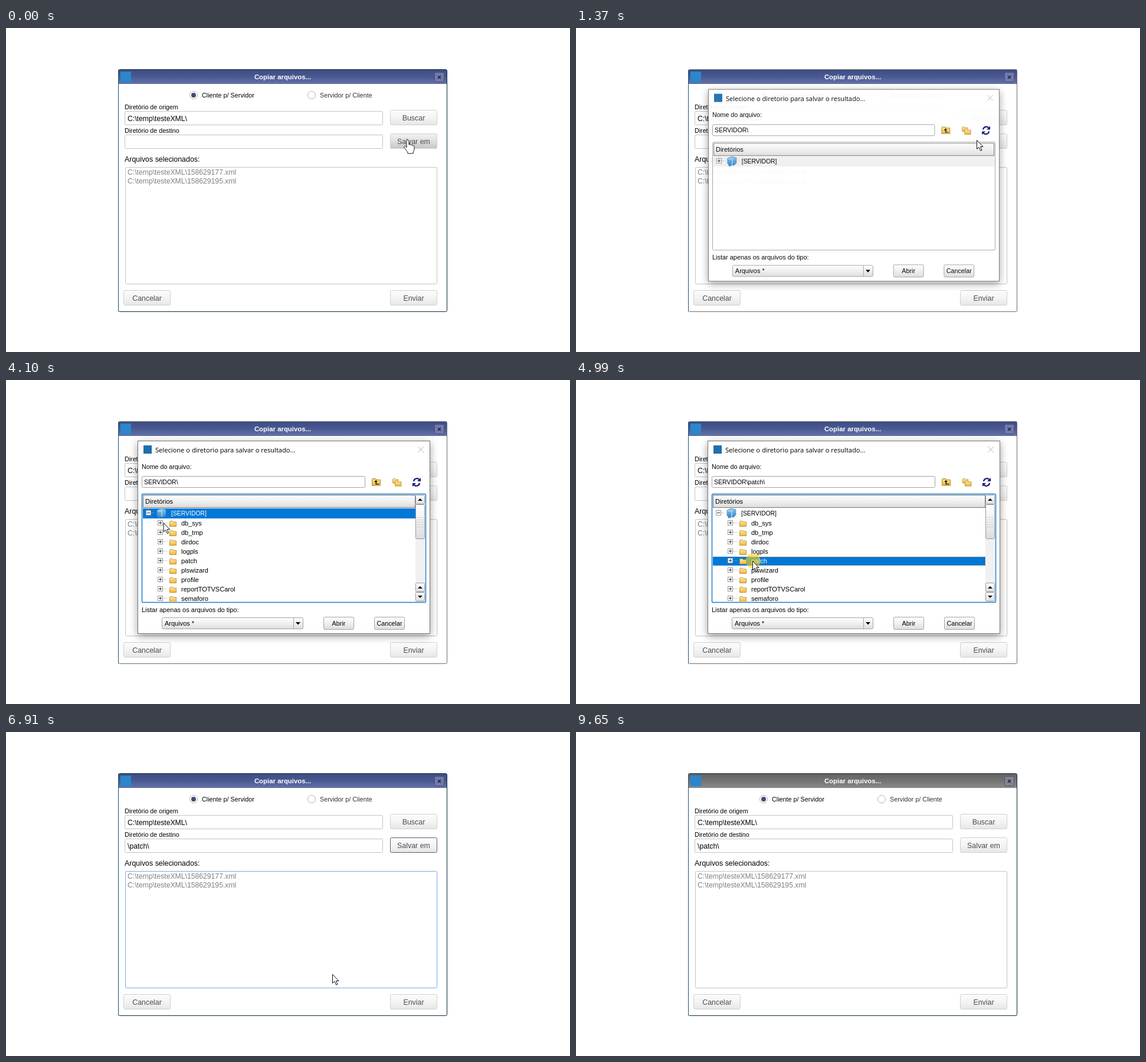
Animation of 956 by 550 pixels, one loop 9.72 s. Source, as an HTML page:

```html
<!DOCTYPE html>
<html lang="pt">
<head>
<meta charset="utf-8">
<title>Copiar arquivos</title>
<style>
html, body { margin: 0; width: 100%; height: 100%; overflow: hidden; background: #fff; }
svg { display: block; font-family: "Liberation Sans", Arial, sans-serif; }
</style>
</head>
<body>
<svg id="stage" width="956" height="550" viewBox="0 0 956 550"></svg>
<script>
const LOOP = 9720;
const stage = document.getElementById('stage');

// Markup helpers
const rect = (x, y, w, h, fill, stroke = 'none', extra = '') =>
  `<rect x="${x}" y="${y}" width="${w}" height="${h}" fill="${fill}" stroke="${stroke}" ${extra}/>`;
const box = (x, y, w, h, fill, stroke, extra = 'rx="2"') =>
  rect(x + .5, y + .5, w - 1, h - 1, fill, stroke, extra);
const path = (d, fill, stroke = 'none', extra = '') =>
  `<path d="${d}" fill="${fill}" stroke="${stroke}" ${extra}/>`;
const text = (x, y, s, size = 11, fill = '#000', extra = '') =>
  `<text x="${x}" y="${y}" font-size="${size}" fill="${fill}" ${extra}>${s}</text>`;
const mid = (x, y, s, size, fill, extra = '') =>
  text(x, y, s, size, fill, `text-anchor="middle" ${extra}`);
const gradient = (id, ...colors) =>
  `<linearGradient id="${id}" x2="0" y2="1">${colors.map((c, i) =>
    `<stop offset="${i / (colors.length - 1)}" stop-color="${c}"/>`).join('')}</linearGradient>`;

const button = (x, y, label, id = '') =>
  box(x, y, 80, 26, 'url(#soft)', '#d0d0d0', `rx="2" ${id && `id="${id}"`}`) +
  mid(x + 40, y + 18, label, 12.4, '#4b4d55');
const smallButton = (x, label, id) =>
  box(x, 402, 52, 22, 'url(#grey)', '#a5a5a5', `rx="2" id="${id}"`) + mid(x + 26, 417, label, 10.8);
const radio = (x, label, on) =>
  `<circle cx="${x}" cy="114" r="6.5" fill="#fff" stroke="#b4b4b4"/>` +
  (on ? `<circle cx="${x}" cy="114" r="4" fill="#454a78"/>` : '') +
  text(x + 14, 118, label, 10.8, on ? '#000' : '#333');
const folder = (x, y, s = 1) =>
  `<g transform="translate(${x} ${y}) scale(${s})">` +
  path('M.5 9.5V1.5L1.5.5H5L6.5 2H11.5V9.5Z', 'url(#gold)', '#b98a2c', 'stroke-width=".9"') + '</g>';
const toggle = (x, y, id = '') =>
  box(x, y, 9, 9, '#fff', '#9a9a9a', '') + path(`M${x + 2} ${y + 4.5}h5`, 'none', '#333') +
  path(`M${x + 4.5} ${y + 2}v5`, 'none', '#333', id);
const scrollButton = (y, dir) =>
  box(694, y, 16, 16, 'url(#grey)', '#999') +
  path(`M698 ${y + 8 + 2 * dir}h8l-4 ${-4 * dir}z`, '#000');

const defs = `<defs>
  ${gradient('active', '#3d4c82', '#4a5a92', '#6473a6')}
  ${gradient('inactive', '#626262', '#747474', '#8a8a8a')}
  ${gradient('soft', '#fcfcfc', '#f4f4f4', '#e6e6e6')}
  ${gradient('hover', '#f2f2f2', '#dedfe0', '#c3c6c9')}
  ${gradient('grey', '#fefefe', '#f0f0f0', '#dcdcdc')}
  ${gradient('abrir', '#f0f4f8', '#dfe3e8', '#c6cfd8')}
  ${gradient('gold', '#ffeaa0', '#efb53c')}
  ${gradient('blue', '#8ecbf2', '#2f7fc4')}
  <filter id="shadow" x="-10%" y="-10%" width="120%" height="125%">
    <feDropShadow dx="0" dy="4" stdDeviation="7" flood-opacity=".38"/>
  </filter>
  <clipPath id="listClip"><path d="M232 195H710V376H232Z"/></clipPath>
</defs>`;

const mainWindow =
  box(190, 70, 558, 412, '#fff', '#0d2b3c', 'rx="2" id="frame"') +
  rect(191, 71, 556, 24, 'url(#active)', 'none', 'id="titleBar"') +
  path('M190.5 72V481', 'none', '#17557c') +
  rect(194, 74, 18, 18, '#2b86cc') +
  mid(469, 87, 'Copiar arquivos...', 11.4, '#fff', 'font-weight="bold"') +
  box(726, 75, 17, 17, '#727aae', '#4a4f80', 'rx="2" id="closeBox"') +
  path('M732 81l5 5m0-5l-5 5', 'none', '#20233c', 'stroke-width="1.6"') +
  radio(318, 'Cliente p/ Servidor', true) + radio(518, 'Servidor p/ Cliente', false) +
  text(201, 138, 'Diretório de origem', 10.7) + box(201, 141, 438, 24, '#fff', '#c3c3c3') +
  text(206, 158, 'C:\\temp\\testeXML\\', 12.2) +
  text(201, 178, 'Diretório de destino', 10.7) + box(201, 181, 438, 24, '#fff', '#c3c3c3') +
  text(206, 198, '\\patch\\', 12.2, '#000', 'id="target"') +
  button(651, 139, 'Buscar') + button(651, 179, 'Salvar em', 'save') +
  text(201, 227, 'Arquivos selecionados:', 12.4) +
  box(202, 236, 529, 199, '#fff', '#c3c3c3', 'rx="2" id="files"') +
  [177, 195].map((n, i) => text(206, 249 + 15 * i, `C:\\temp\\testeXML\\158629${n}.xml`, 12.2, '#808080')).join('') +
  button(199, 445, 'Cancelar') + button(651, 445, 'Enviar');

const names = ['db_sys', 'db_tmp', 'dirdoc', 'logpls', 'patch', 'plswizard', 'profile', 'reportTOTVSCarol', 'semaforo'];
const children = names.map((name, i) => {
  const y = 243 + 16 * i;
  return path(`M266 ${y - .5}h8`, 'none', '#aaa', 'stroke-dasharray="1 1"') +
    toggle(257, y - 5) + folder(277, y - 4) +
    text(297, y + 4, name, 11, '#000', `id="${name}"`);
}).join('');

const grip = Array.from({ length: 20 }, (_, i) =>
  rect(697 + i % 4 * 3, 233 + (i >> 2) * 4, 1, 1, '#999')).join('');
const scrollbar = '<g id="scroll">' + rect(694, 195, 16, 181, '#f1f1f1') +
  scrollButton(195, 1) + box(694, 211, 16, 59, 'url(#grey)', '#999') + grip +
  scrollButton(344, 1) + scrollButton(360, -1) + '</g>';

const refresh = path('M691 172a5.5 5.5 0 0 1 9.5-3M701 175a5.5 5.5 0 0 1-9.5 3', 'none', '#15157c', 'stroke-width="2.2"') +
  path('M703 166v6h-6zM689 181v-6h6z', '#15157c');

const dialog =
  box(223, 103, 496, 328, '#fff', '#777', 'filter="url(#shadow)"') +
  rect(233, 111, 14, 14, '#1f6fae') +
  text(253, 123, 'Selecione o diretorio para salvar o resultado...', 11.15, '#000', 'font-family="Open Sans, sans-serif"') +
  path('M698 113l10 10m0-10l-10 10', 'none', '#bbb') +
  text(230, 151, 'Nome do arquivo:', 10.7) +
  box(230, 163, 379, 20, '#fff', '#a3a3a3') + text(234, 177, '', 10.5, '#000', 'id="fileName"') +
  folder(620, 167, 1.25) + path('M624 173l3-3 3 3h-2v3h4v1.2h-5.5V173z', '#111') +
  folder(655, 167, .85) + folder(659, 171, .95) + refresh +
  box(230, 193, 482, 185, '#fff', '#a3a3a3', 'rx="2" id="list"') +
  '<g clip-path="url(#listClip)">' +
  rect(232, 218, 478, 17, '#f0f0f0', 'none', 'id="selection"') +
  box(232, 195, 478, 22, 'url(#grey)', '#777', 'id="header"') + text(236, 210, 'Diretórios', 11) +
  path('M246 225.5h6M241.5 218v3', 'none', '#aaa', 'stroke-dasharray="1 1"') +
  toggle(237, 221, 'id="plus"') +
  path('M256 221l7-3 8 2v9l-4 4-5-1v2h-4v-2l-2-2z', 'url(#blue)', '#4b88ba', 'stroke-width=".7"') +
  path('M264 220v12M257 222l6 1', 'none', '#d6edfb') +
  text(280, 230, '[SERVIDOR]', 10.4, '#000', 'id="root"') +
  `<g id="children">${children}</g>` +
  path('M294.5 300.5H693.5V314.5H294.5Z', 'none', '#e08a30', 'stroke-dasharray="1 1" id="focusBox"') +
  scrollbar + '</g>' +
  text(230, 394, 'Listar apenas os arquivos do tipo:', 11) +
  box(264, 403, 240, 20, 'url(#grey)', '#a5a5a5') + path('M487.5 404v18', 'none', '#a5a5a5') +
  path('M491 411h8l-4 4.5z', '#000') + text(269, 417, 'Arquivos *', 11) +
  smallButton(538, 'Abrir', 'open') + path('M539 403.5h50M539 422.5h50', 'none', '#4d9be0', 'stroke-width="2" id="openGlow"') +
  smallButton(624, 'Cancelar', 'cancel');

const arrow = path('M.5.5V15.5L4 12.3 6.6 18.3 9 17.3 6.5 11.5H11Z', '#fff', '#111', 'id="arrow"');
const hand = path('M-2 2C-2-1 2-1 2 2V8C3 6.5 5.5 7 5.5 9C6.5 7.8 8.5 8.3 8.5 10C9.5 9 11 9.7 11 11.5V16' +
  'C11 18 9 20 9 23H0C0 20-3 17-6 13C-7.5 11-5 9.5-3.5 11L-2 13Z', '#fff', '#111', 'id="hand" transform="translate(2 0)"') ;

stage.innerHTML = defs + mainWindow + `<g id="dialog">${dialog}</g>` +
  '<circle id="click" r="12.5" fill="#f5d21e" fill-opacity=".62"/>' +
  `<g id="cursor">${arrow}${hand}</g>`;

const $ = Object.fromEntries([...stage.querySelectorAll('[id]')].map(el => [el.id, el]));
const set = (id, attrs) => { for (const k in attrs) $[id].setAttribute(k, attrs[k]); };
const show = (id, on) => set(id, { display: on ? 'inline' : 'none' });

const clamp = v => Math.min(1, Math.max(0, v));
const progress = (t, from, to) => clamp((t - from) / (to - from));
const ease = u => u * u * (3 - 2 * u);

// Cursor moves: start, end, number of steps, bend point, destination
const moves = [
  [1940, 2580, 9, [460, 278], [241, 226]],
  [3890, 4750, 12, [333, 280], [299, 307]],
  [5570, 6280, 10, [400, 292], [553, 411]],
  [8210, 8730, 8, [640, 470], [748, 552]],
];
const clicks = [[780, 860], [2910, 2990], [4990, 5110], [6580, 6660]];

function cursorAt(t) {
  let pos = [679, 190];
  for (const [from, to, n, bend, dest] of moves) {
    if (t < from) break;
    const step = Math.floor((t - from) / (to - from) * (n - 1) + 1e-6) + 1;
    const u = ease(clamp(step / n)), v = 1 - u;
    pos = pos.map((p, i) => v * v * p + 2 * u * v * bend[i] + u * u * dest[i]);
  }
  return pos;
}

function draw(t) {
  const [x, y] = cursorAt(t);
  const overOpen = t >= 6200 && t < 6740;
  const overSave = t < 1200;
  const expanded = t >= 3070;
  const picked = t >= 4990;
  const returned = t >= 6830;
  const inactive = t >= 9650;

  set('cursor', { transform: `translate(${x} ${y})` });
  show('hand', overSave || overOpen);
  show('arrow', !overSave && !overOpen);
  set('click', { cx: x + 1, cy: y });
  show('click', clicks.some(([a, b]) => t >= a && t < b));

  // Main window
  set('frame', { stroke: overSave || returned ? '#0d2b3c' : '#6d6d6d' });
  set('titleBar', { fill: inactive ? 'url(#inactive)' : 'url(#active)' });
  set('closeBox', { fill: inactive ? '#85858f' : '#727aae' });
  set('save', {
    fill: overSave ? 'url(#hover)' : 'url(#soft)',
    stroke: returned && !inactive ? '#5c5f78' : '#d0d0d0',
  });
  set('files', { stroke: returned && y < 435 ? '#77a9ee' : '#c3c3c3' });
  show('target', returned);

  // Dialog fades and grows in, then shrinks away
  const opening = 1 - (1 - progress(t, 1180, 1420)) ** 2;
  const visible = opening * (1 - progress(t, 6700, 6880));
  const scale = .9 + .1 * visible;
  show('dialog', visible > 0);
  set('dialog', { opacity: visible, transform: `translate(471 267) scale(${scale}) translate(-471 -267)` });

  $.fileName.textContent = picked ? 'SERVIDOR\\patch\\' : 'SERVIDOR\\';
  for (const id of ['children', 'scroll']) show(id, expanded);
  show('plus', !expanded);
  show('focusBox', picked);
  set('header', { width: expanded ? 461 : 477 });
  set('list', { stroke: expanded ? '#1a7fd4' : '#a3a3a3', 'stroke-width': expanded ? 1.5 : 1 });
  set('selection', {
    y: picked ? 300 : 218,
    height: picked ? 15 : 17,
    width: expanded ? 462 : 478,
    fill: expanded ? '#0078d7' : '#f0f0f0',
  });
  set('root', { fill: expanded && !picked ? '#fff' : '#000' });
  set('patch', { fill: picked ? '#fff' : '#000' });
  set('open', { fill: overOpen ? 'url(#abrir)' : 'url(#grey)' });
  show('openGlow', overOpen);
}

const start = performance.now();
function tick() {
  draw((performance.now() - start) % LOOP);
  requestAnimationFrame(tick);
}
tick();
</script>
</body>
</html>
```
